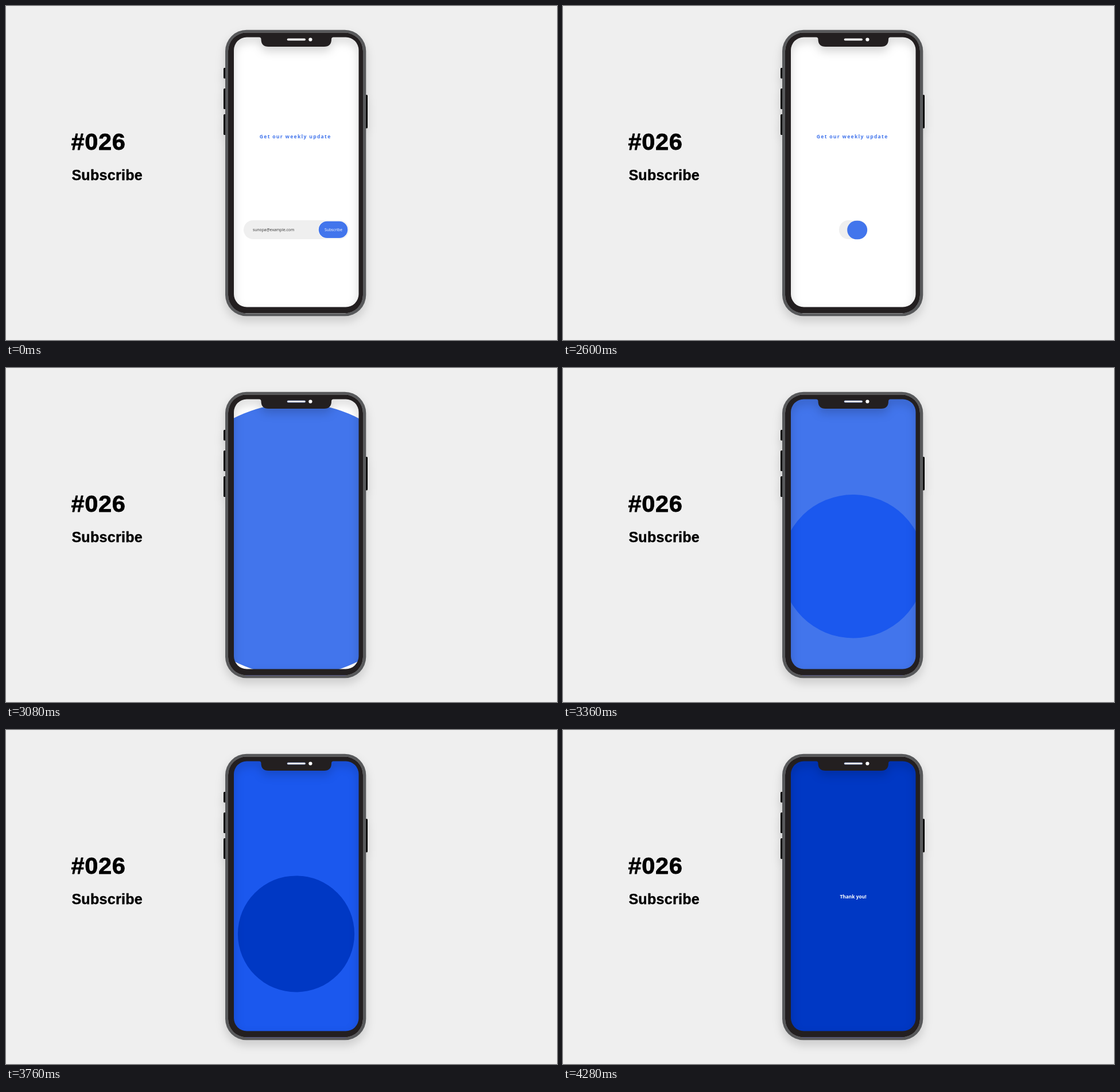
Recreate the animation shown at these times as an HTML page. Size 960x583 px, loop 6.48 s.

```html
<!DOCTYPE html>
<html lang="en">
<head>
<meta charset="utf-8">
<title>Subscribe</title>
<style>
  html, body { margin: 0; width: 100%; height: 100%; overflow: hidden; background: #efefef; }
  svg { display: block; width: 100vw; height: 100vh; }
  text { font-family: "Open Sans", "Noto Sans", sans-serif; }
  .title { font-family: "Liberation Sans", Arial, sans-serif; font-weight: 700; stroke: #000; stroke-linejoin: round; }
  .frame { filter: drop-shadow(0 8px 8px rgba(0, 0, 0, .17)); }
</style>
</head>
<body>
<svg viewBox="0 0 960 583">
  <defs>
    <clipPath id="screen"><rect x="396" y="53.5" width="219.5" height="473.5" rx="24"/></clipPath>
    <clipPath id="pillClip"><rect id="pillMask" x="414" y="374" width="183" height="33" rx="16.5"/></clipPath>
  </defs>
  <rect width="960" height="583" fill="#efefef"/>

  <text class="title" x="113.6" y="251" font-size="41.5" letter-spacing=".6" stroke-width=".8">#026</text>
  <text class="title" x="114.4" y="304.3" font-size="25" letter-spacing=".3" stroke-width=".4">Subscribe</text>

  <g clip-path="url(#screen)">
    <rect x="390" y="50" width="232" height="482" fill="#fff"/>
    <text x="441.8" y="230.8" font-size="8.65" font-weight="700" letter-spacing="1.28" fill="#4275ec">Get our weekly update</text>
    <rect id="pill" x="414" y="374" width="183" height="33" rx="16.5" fill="#efefef"/>
    <g clip-path="url(#pillClip)">
      <text id="email" x="430" y="393" font-size="6.8" fill="#333">sunopa@example.com</text>
    </g>
    <rect id="ring" fill="#fff"/>
    <rect id="button" fill="#4275ec"/>
    <text id="label" x="570.5" y="392.7" font-size="6.8" text-anchor="middle" fill="#fff">Subscribe</text>
    <g id="waves"></g>
    <text id="thanks" x="505.5" y="294.4" font-size="8.4" font-weight="700" text-anchor="middle" fill="#fff">Thank you!</text>
  </g>

  <g class="frame">
    <g fill="#000">
      <rect x="379" y="108" width="5" height="18.5" rx="1.5"/>
      <rect x="379" y="144" width="5" height="36" rx="1.5"/>
      <rect x="379" y="189" width="5" height="36" rx="1.5"/>
      <rect x="625" y="155" width="5" height="58.5" rx="1.5"/>
    </g>
    <path id="rim" fill="#58595b" fill-rule="evenodd"/>
    <path id="body" fill="#231f20" fill-rule="evenodd"/>
  </g>
  <rect id="slit" x="417" y="536" width="175" height="1.2" rx=".6"/>
  <rect id="slot" x="490" y="57" width="31.6" height="3" rx="1.5" fill="#fff" stroke-width=".7"/>
  <circle cx="530.4" cy="58.5" r="3.1" fill="#fff"/>
</svg>
<script>
const LOOP = 6480, STEP = 40;
const $ = id => document.getElementById(id);
const set = (el, attrs) => { for (const k in attrs) el.setAttribute(k, attrs[k]); };
const mix = (a, b, p) => a + (b - a) * p;

// cubic-bezier(.25, .1, .25, 1)
function ease(x) {
  if (x <= 0) return 0;
  if (x >= 1) return 1;
  const bez = (a, b, u) => 3 * a * u * (1 - u) ** 2 + 3 * b * u * u * (1 - u) + u ** 3;
  let lo = 0, hi = 1;
  for (let i = 0; i < 24; i++) {
    const mid = (lo + hi) / 2;
    if (bez(.25, .25, mid) < x) lo = mid; else hi = mid;
  }
  return bez(.1, 1, lo);
}
const run = (t, start, length) => ease((t - start) / length);

const roundRect = (x, y, w, h, r) =>
  `M${x + r} ${y}h${w - 2 * r}a${r} ${r} 0 0 1 ${r} ${r}v${h - 2 * r}a${r} ${r} 0 0 1 ${-r} ${r}` +
  `h${2 * r - w}a${r} ${r} 0 0 1 ${-r} ${-r}v${2 * r - h}a${r} ${r} 0 0 1 ${r} ${-r}z`;
const opening = 'M419.5 54.5H441q3.5 0 3.5 3.5q0 13 13 13H554q13 0 13-13q0-3.5 3.5-3.5H592' +
  'a22.5 22.5 0 0 1 22.5 22.5V503a22.5 22.5 0 0 1-22.5 22.5H419.5a22.5 22.5 0 0 1-22.5-22.5V77a22.5 22.5 0 0 1 22.5-22.5z';
const inner = [387, 46.5, 235, 490, 32];
set($('rim'), { d: roundRect(382, 41.8, 245.3, 499.5, 37) + roundRect(...inner) });
set($('body'), { d: roundRect(...inner) + opening });

const MID = 505.5, R0 = 16.5, R1 = 266;
const waves = ['#4275ec', '#1b58ee', '#0038c4'].map((fill, i) => {
  const el = document.createElementNS('http://www.w3.org/2000/svg', 'circle');
  set(el, { cx: MID, fill });
  $('waves').append(el);
  return { el, start: 2838 + 417 * i };
});

function draw(t) {
  const morph = run(t, 2400, 330);
  set($('label'), { opacity: 1 - run(t, 2190, 200) });
  set($('email'), { opacity: 1 - run(t, 2390, 160) });

  // the pill closes around its middle and the button follows its right end
  const width = mix(183.5, 2 * R0, morph);
  const pill = { x: MID + .2 - width / 2, width };
  set($('pill'), pill);
  set($('pillMask'), pill);
  const h = mix(29.4, 2 * R0, morph), w = mix(50.5, 2 * R0, morph);
  const x = MID + width / 2 - mix(2, 0, morph) - w, y = mix(390.4, 391, morph) - h / 2;
  set($('button'), { x, y, width: w, height: h, rx: h / 2 });
  set($('ring'), { x: x - .7, y: y - .7, width: w + 1.4, height: h + 1.4, rx: h / 2 + .7, opacity: 1 - morph });

  for (const { el, start } of waves) {
    const r = t > start ? mix(R0, R1, run(t, start, 400)) : 0;
    set(el, { r, cy: 391 - (r - R0) * .412 });
  }
  set($('thanks'), { opacity: run(t, 4075, 200) });

  const blue = t >= 3080;
  set($('slit'), { fill: blue ? '#55557a' : '#858587' });
  set($('slot'), { stroke: blue ? '#8fa9e8' : '#fff' });
}

const origin = performance.now();
function tick() {
  const t = (performance.now() - origin) % LOOP;
  draw(Math.floor(t / STEP) * STEP);
  requestAnimationFrame(tick);
}
draw(0);
requestAnimationFrame(tick);
</script>
</body>
</html>
```
